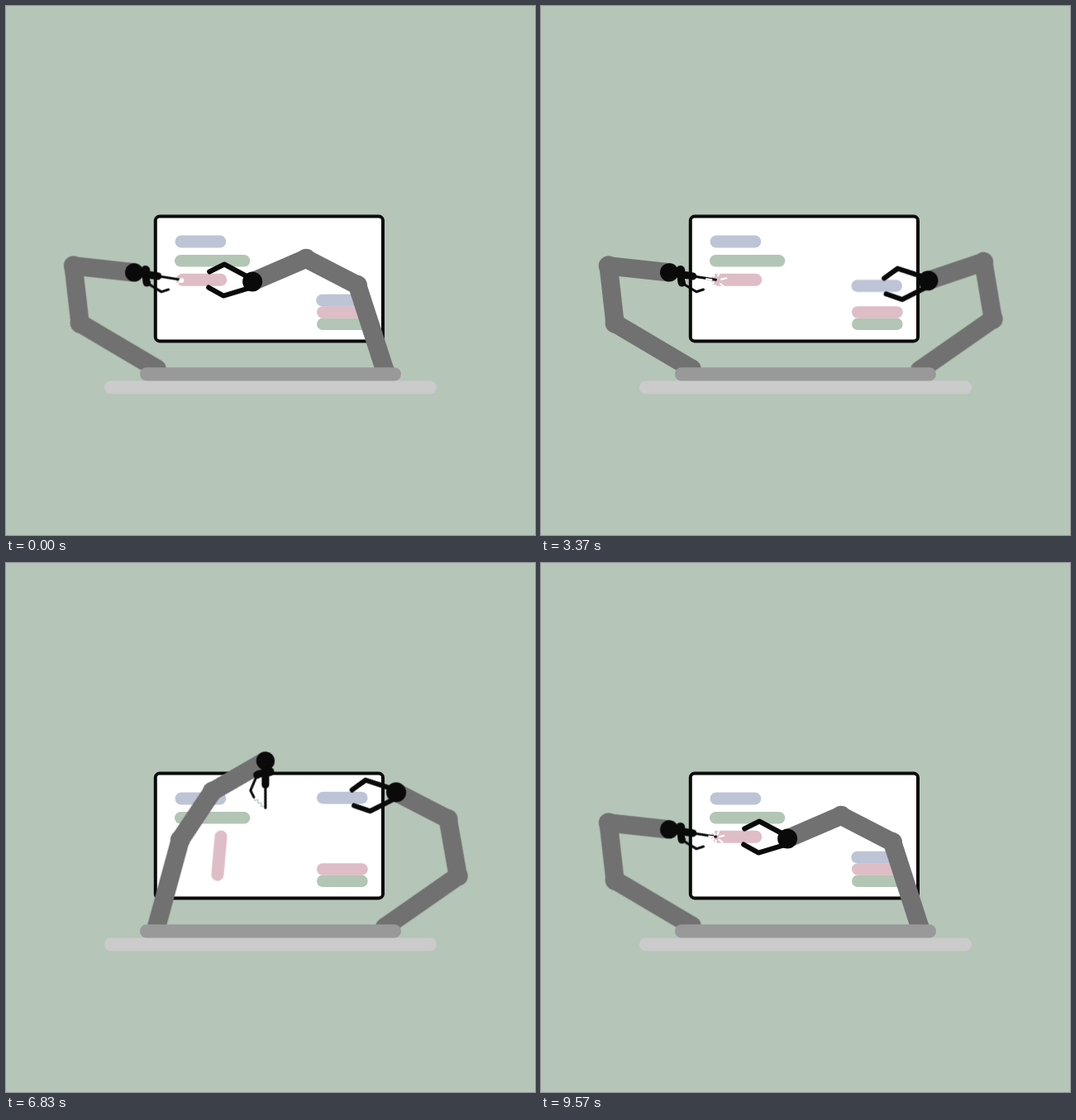
An HTML page without scripts for the animation above (9610 ms loop, 640 by 640 pixels).

```html
<!DOCTYPE html>
<html lang="en">
<head>
<meta charset="utf-8">
<title>Robot arms at work</title>
<style>
  /* absolute angles: a, b, c = arm segments, h = hand, o = claw opening */
  @property --a { syntax: "<angle>"; inherits: true; initial-value: 0deg; }
  @property --b { syntax: "<angle>"; inherits: true; initial-value: 0deg; }
  @property --c { syntax: "<angle>"; inherits: true; initial-value: 0deg; }
  @property --h { syntax: "<angle>"; inherits: true; initial-value: 0deg; }
  @property --o { syntax: "<angle>"; inherits: true; initial-value: 0deg; }

  :root {
    --loop: 9610ms;
    --smooth: cubic-bezier(.333, 0, .667, 1);
  }
  html, body { margin: 0; width: 100%; height: 100%; overflow: hidden; background: #b5c5b8; }
  svg { display: block; width: 100vw; height: 100vh; }

  .blue { fill: #bdc4d6; }
  .green { fill: #b3c5b4; }
  .pink { fill: #debdc6; }
  .seg { stroke: #717171; stroke-width: 22.4; }
  .joint { fill: #717171; }
  .ink { fill: none; stroke: #0a0a0a; stroke-linecap: round; stroke-linejoin: round; }
  .palm { fill: #0a0a0a; }

  .s1 { transform: rotate(var(--a)); }
  .s2 { transform: translate(108px, 0) rotate(calc(var(--b) - var(--a))); }
  .s3 { transform: translate(70px, 0) rotate(calc(var(--c) - var(--b))); }
  .hand { transform: translate(var(--reach), 0) rotate(calc(var(--h) - var(--c))); }
  .upper { transform: rotate(var(--o)); }
  .lower { transform: rotate(calc(-1 * var(--o))); }

  .left { --reach: 74px; animation: left var(--loop) var(--smooth) infinite, aim var(--loop) var(--smooth) infinite; }
  .right { --reach: 70.5px; animation: right var(--loop) var(--smooth) infinite; }
  .lift { animation: lift var(--loop) var(--smooth) infinite; }
  .swing { transform-origin: 259.7px 331px; animation: swing var(--loop) var(--smooth) infinite; }
  .zigzag { fill: none; stroke-width: 1.2; animation: glow var(--loop) step-end infinite; }
  .weld { animation: weld var(--loop) step-end infinite; }
  .reweld { animation: reweld var(--loop) step-end infinite; }
  .rays { fill: none; stroke: #fff; stroke-width: 2.2; animation: rays 533.89ms linear infinite; }
  .late { animation-delay: -110ms; }
  .dot { fill: #fff; animation: dot 533.89ms step-end infinite; }

  @keyframes left {
    0%, 35.9% { --a: -149.4deg; --b: -96.5deg; --c: 6.3deg; }
    50.5% { --a: -64.8deg; --b: -49.2deg; --c: -29.8deg; }
    62.5% { --a: -64.8deg; --b: -49.2deg; --c: -29.8deg; animation-timing-function: cubic-bezier(.333, 0, .667, .333); }
    71.07% { --a: -74.7deg; --b: -56.3deg; --c: -30deg; animation-timing-function: cubic-bezier(.35, .2, .5, 1); }
    85.85%, 90.53% { --a: -146.3deg; --b: -111.2deg; --c: -30deg; }
    98.34%, 100% { --a: -149.4deg; --b: -96.5deg; --c: 6.3deg; }
  }
  @keyframes aim {
    0% { --h: 8.9deg; }
    35.9% { --h: 8.9deg; animation-timing-function: cubic-bezier(.333, 0, .667, .333); }
    50.68% { --h: 62.6deg; animation-timing-function: cubic-bezier(.333, .667, .667, 1); }
    57.96%, 62.12% { --h: 131deg; }
    70.2%, 90.53% { --h: 90deg; }
    98.34%, 100% { --h: 8.9deg; }
  }
  @keyframes right {
    0%, 10.4% { --a: -107.9deg; --b: -152.7deg; --c: -203.3deg; --h: 0deg; --o: 0deg; }
    19.77% { --a: -93.7deg; --b: -138deg; --c: -189.5deg; --h: -22deg; --o: 4.5deg; }
    25.8% { --a: -34.9deg; --b: -80deg; --c: -133deg; --h: -10deg; --o: 6deg; }
    30.2%, 32.47% { --a: -34.9deg; --b: -99.4deg; --c: -213.5deg; --h: -10deg; --o: 0deg; }
    40.58%, 72.84% { --a: -34.9deg; --b: -100deg; --c: -152.7deg; --h: -10deg; --o: 0deg; }
    79.1% { --a: -34.9deg; --b: -99.4deg; --c: -213.5deg; --h: -10deg; --o: 0deg; }
    82.5% { --a: -34.9deg; --b: -99.4deg; --c: -208deg; --h: -10deg; --o: 6deg; animation-timing-function: cubic-bezier(.4, 0, .7, .9); }
    86.68% { --a: -98deg; --b: -142.1deg; --c: -185deg; --h: -80deg; --o: 4deg; animation-timing-function: cubic-bezier(.3, .2, .5, 1); }
    92.1% { --a: -130deg; --b: -158deg; --c: -148deg; --h: -90deg; --o: 0deg; }
    93.65% { --a: -130deg; --b: -158deg; --c: -148deg; --h: -90deg; --o: 0deg; animation-timing-function: cubic-bezier(.333, 0, .667, .333); }
    96.25% { --a: -112deg; --b: -151deg; --c: -178deg; --h: -45deg; --o: 0deg; animation-timing-function: cubic-bezier(.333, .667, .667, 1); }
    98.86%, 100% { --a: -107.9deg; --b: -152.7deg; --c: -203.3deg; --h: 0deg; --o: 0deg; }
  }
  @keyframes lift {
    0%, 32.47% { transform: translate(0, 0); }
    40.58%, 72.84% { transform: translate(.7px, -72px); }
    79.1%, 100% { transform: translate(0, 0); }
  }
  @keyframes swing {
    0%, 48.9% { transform: rotate(0deg); }
    50.68% { transform: rotate(-3.5deg); }
    57.96%, 62.12% { transform: rotate(-10deg); }
    71.07% { transform: rotate(-85deg); }
    73% { transform: rotate(-90deg); }
    93.65% { transform: rotate(-90deg); animation-timing-function: cubic-bezier(.333, 0, .667, .333); }
    96.25% { transform: rotate(-45deg); animation-timing-function: cubic-bezier(.333, .667, .667, 1); }
    98.86%, 100% { transform: rotate(0deg); }
  }
  @keyframes glow {
    0%, 98.8% { stroke: #fff; }
    35.9% { stroke: #b5c5b8; }
  }
  @keyframes weld {
    0% { visibility: visible; }
    35.9%, 100% { visibility: hidden; }
  }
  @keyframes reweld {
    0% { visibility: hidden; }
    98.86%, 100% { visibility: visible; }
  }
  @keyframes rays {
    0% { stroke-dasharray: 0 1 0 99; }
    13% { stroke-dasharray: 0 3 7 99; }
    31% { stroke-dasharray: 0 5 8 99; }
    43% { stroke-dasharray: 0 7 13 99; }
    100% { stroke-dasharray: 0 39 0 99; }
  }
  @keyframes dot {
    0% { opacity: 1; }
    12%, 100% { opacity: 0; }
  }
</style>
</head>
<body>
<svg viewBox="0 0 640 640">
  <defs>
    <path id="burst" d="M0 0L13 -37M0 0L38 -9M0 0L30 25M0 0L-7 38M0 0L-34 17M0 0L-39 -6M0 0L-20 -33"/>
  </defs>

  <rect x="180.8" y="254.6" width="275.2" height="150.8" rx="5" fill="#fff" stroke="#0a0a0a" stroke-width="4"/>

  <rect class="blue" x="204.5" y="277.5" width="61.8" height="15" rx="7.5"/>
  <rect class="green" x="204" y="301" width="91.3" height="14.6" rx="7.3"/>
  <rect class="pink swing" x="205.8" y="323.7" width="61.5" height="15" rx="7.5"/>

  <rect class="green" x="376" y="377.5" width="61.7" height="14.6" rx="7.3"/>
  <rect class="pink" x="376" y="363.2" width="61.7" height="14.6" rx="7.3"/>
  <rect class="blue lift" x="375.2" y="348.8" width="61.7" height="14.6" rx="7.3"/>

  <g transform="translate(182.5 438.8)">
    <g class="left">
      <g class="s1">
        <path class="seg" d="M0 0H108"/>
        <circle class="joint" r="11.2"/>
        <g class="s2">
          <path class="seg" d="M0 0H70"/>
          <circle class="joint" r="11.9"/>
          <g class="s3">
            <path class="seg" d="M0 0H74"/>
            <circle class="joint" r="11.9"/>
            <g class="hand">
              <path class="zigzag" d="M44 14l4 -1l-1 -4l4 0l0 -4l4 0l0 -4l3 -1"/>
              <path class="ink" stroke-width="3" d="M25 0H57M17 10L36 18L44 14"/>
              <path class="ink" stroke-width="9" d="M8 0H29M13 -5L16 8"/>
              <circle class="palm" cx="13" cy="-5" r="5.5"/>
              <circle class="palm" cx="17" cy="10" r="4.7"/>
              <circle class="palm" r="11.2"/>
            </g>
          </g>
        </g>
      </g>
    </g>
  </g>

  <g transform="translate(458.3 440.5)">
    <g class="right">
      <g class="s1">
        <path class="seg" d="M0 0H108"/>
        <circle class="joint" r="11.2"/>
        <g class="s2">
          <path class="seg" d="M0 0H70"/>
          <circle class="joint" r="11.9"/>
          <g class="s3">
            <path class="seg" d="M0 0H70.5"/>
            <circle class="joint" r="11.9"/>
            <g class="hand">
              <path class="ink upper" stroke-width="6" d="M-6 -6L-34 -21L-52 -12"/>
              <path class="ink lower" stroke-width="6" d="M-2 7L-35 17L-53 7"/>
              <circle class="palm" r="12"/>
            </g>
          </g>
        </g>
      </g>
    </g>
  </g>

  <rect x="119" y="453.5" width="402" height="16" rx="8" fill="#cbcbcb"/>
  <rect x="162" y="437.2" width="316" height="16.4" rx="8.2" fill="#999"/>

  <g transform="translate(212.3 332)">
    <g class="weld">
      <use class="rays" href="#burst"/>
      <circle class="dot" r="3"/>
    </g>
    <g class="reweld">
      <use class="rays late" href="#burst"/>
    </g>
  </g>
</svg>
</body>
</html>
```
